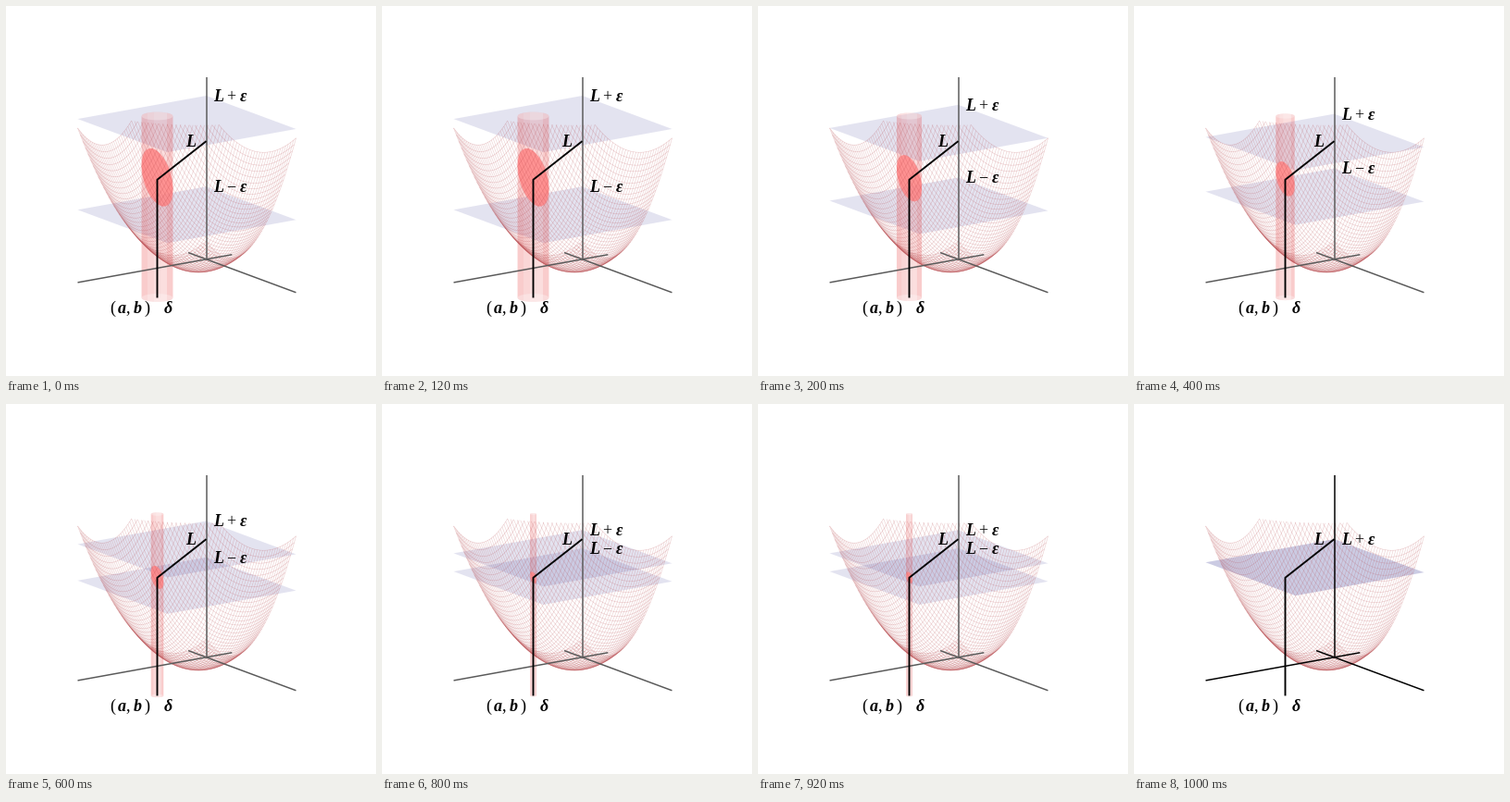
Animation, 400 px wide and 400 px high, one loop 1.2 s. Source, as a matplotlib script:

```python
import numpy as np
import matplotlib.pyplot as plt
from matplotlib.animation import FuncAnimation
from matplotlib.collections import LineCollection

plt.rcParams.update({
    "mathtext.fontset": "custom",
    "mathtext.rm": "Liberation Serif",
    "mathtext.bfit": "Liberation Serif:italic:bold",
    "mathtext.fallback": "stix",
})

STEPS, INTERVAL = 6, 200
SIDE, TOP = 5, 6          # domain is [0, SIDE]^2, heights are cut at TOP
A, B = 4, 3               # the point where the limit is taken
PX = 0.72                 # one pixel in points at 100 dpi
ORIGIN = np.array([216.5, 273.8])
AXES = np.array([[-27.8, 5.02], [19.4, 7.19], [0, -32.74]])


def surface(x, y):
    return 0.3 * ((x - 1) ** 2 + (y - 1) ** 2)


def project(x, y, z):
    """Parallel projection of a space point to stage pixels."""
    points = np.stack(np.broadcast_arrays(x, y, z), axis=-1)
    return ORIGIN + points @ AXES


def mesh_lines():
    lines = []
    for s in np.linspace(0, SIDE, 51):
        end = min(SIDE, 1 + np.sqrt(TOP / 0.3 - (s - 1) ** 2))
        t = np.linspace(0, end, 90)
        z = surface(s, t)
        lines += [project(s, t, z), project(t, s, z)]
    return lines


LIMIT = surface(A, B)
MESH = mesh_lines()
TURN = np.linspace(0, 2 * np.pi, 121)

fig = plt.figure(figsize=(4, 4), dpi=100, facecolor="white")
ax = fig.add_axes([0, 0, 1, 1])


def fill(points, color, alpha):
    ax.fill(*points.T, color=color, alpha=alpha, lw=0)


def path(points, color, width):
    ax.plot(*project(*np.transpose(points)).T, color=color, lw=width * PX,
            solid_capstyle="butt", solid_joinstyle="miter")


def label(x, baseline, text):
    ax.text(x, baseline, text, fontsize=18 * PX, va="baseline")


def draw_plane(height):
    corners = np.array([[0, 0], [SIDE, 0], [SIDE, SIDE], [0, SIDE]])
    fill(project(*corners.T, height), (0.31, 0.31, 0.63), 0.155)


def draw_tube(radius):
    x, y = A + radius * np.cos(TURN), B + radius * np.sin(TURN)
    base, lid = project(x, y, 0), project(x, y, TOP)
    (cx, low), (_, high) = project(A, B, 0), project(A, B, TOP)
    half = 33.9 * radius
    # vertical bands, paler toward the middle
    edges = np.array([-1, -0.62, -0.2, 0.62, 1])
    for left, right, alpha in zip(edges, edges[1:], (0.23, 0.19, 0.15, 0.23)):
        t = np.linspace(left, right, 12)
        sag = half * 0.2588 * np.sqrt(1 - t ** 2)
        x = cx + half * t
        outline = np.vstack([np.c_[x, high - sag],
                             np.c_[x, low + sag][::-1]])
        fill(outline, (0.9, 0.15, 0.15), alpha)
    for cap in (base, lid):
        fill(cap, "white", 0.3)


def draw_patch(radius):
    x, y = A + radius * np.cos(TURN), B + radius * np.sin(TURN)
    fill(project(x, y, surface(x, y)), (1, 0.52, 0.52), 0.85)


def draw(step):
    ax.clear()
    ax.set(xlim=(0, 400), ylim=(400, 0))
    ax.axis("off")
    eps = 1.5 - 0.3 * step
    closed = step == STEPS - 1
    delta = eps / 3

    ax.add_collection(LineCollection(MESH, colors=[(0.7, 0.22, 0.24, 0.24)],
                                     linewidths=0.6 * PX))
    draw_plane(LIMIT - eps)
    draw_plane(LIMIT + eps)
    if not closed:
        draw_tube(delta)
        draw_patch(delta)

    ink = "black" if closed else "#5a5a5a"
    path([(-1, 0, 0), (SIDE, 0, 0)], ink, 1.5)
    path([(0, -1, 0), (0, SIDE, 0)], ink, 1.5)
    path([(0, 0, 0), (0, 0, TOP)], ink, 1.5)
    path([(A, B, 0), (A, B, LIMIT), (0, 0, LIMIT)], "black", 1.9)

    rise = 32.74 * eps
    label(223.5, 152 - rise, r"$\mathbfit{L}+\mathbfit{\epsilon}$")
    if not closed:
        label(223.5, 152 + rise, r"$\mathbfit{L}-\mathbfit{\epsilon}$")
    label(193.5, 152, r"$\mathbfit{L}$")
    label(112.5, 331.5, r"$(\,\mathbfit{a},\mathbfit{b}\,)$")
    label(170.5, 332, r"$\mathbfit{\delta}$")
    return ax.get_children()


animation = FuncAnimation(fig, draw, frames=STEPS, interval=INTERVAL,
                          repeat=True, repeat_delay=0, init_func=lambda: [])
plt.show()
```
